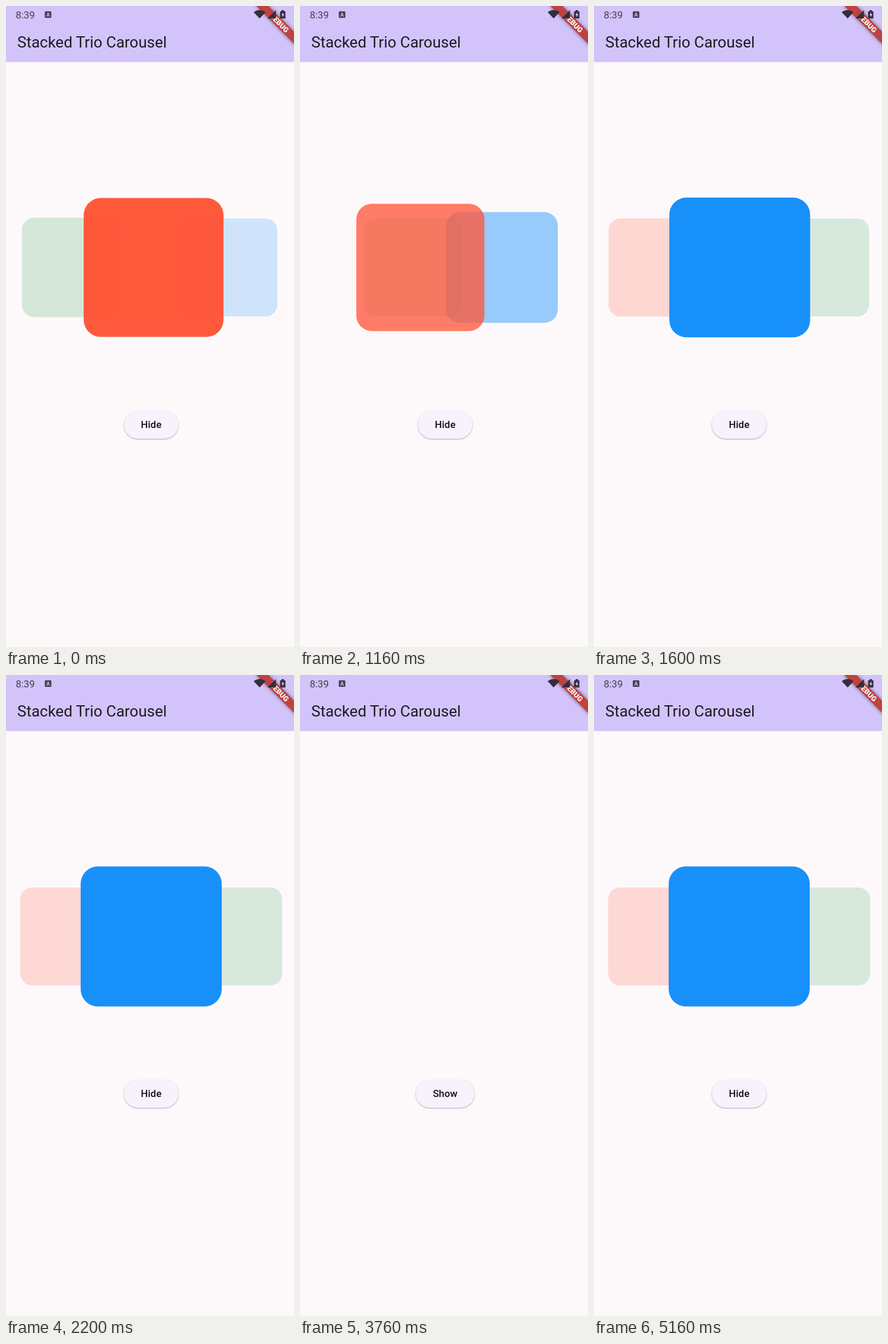
An HTML page that plays this animation: 486x1080 px, repeating every 5.2 s.

```html
<!DOCTYPE html>
<html lang="en">
<head>
<meta charset="utf-8">
<title>Stacked Trio Carousel</title>
<style>
  html, body { margin: 0; width: 100%; height: 100%; overflow: hidden; background: #fdf9fb; }
  svg { display: block; width: 100vw; height: 100vh; }
  text { font-family: Roboto, "Open Sans", sans-serif; }
  .shadow { filter: drop-shadow(0 1px 1px rgba(40, 20, 60, .38)); }
</style>
</head>
<body>
<svg viewBox="0 0 486 1080" xmlns="http://www.w3.org/2000/svg">
  <defs>
    <radialGradient id="ink">
      <stop offset="0" stop-color="#4d2a6e" stop-opacity=".11"/>
      <stop offset=".5" stop-color="#4d2a6e" stop-opacity=".1"/>
      <stop offset="1" stop-color="#4d2a6e" stop-opacity=".035"/>
    </radialGradient>
    <clipPath id="pill"><rect class="pill" y="682" height="47" rx="23.5"/></clipPath>
    <filter id="blur" x="-20%" y="-100%" width="140%" height="300%"><feGaussianBlur stdDeviation="3"/></filter>
  </defs>

  <rect width="486" height="1080" fill="#fdf9fb"/>
  <rect width="486" height="94.5" fill="#d3c3fb"/>
  <text x="19" y="70" font-size="26" fill="#1d1b20">Stacked Trio Carousel</text>

  <g id="cards"></g>

  <rect class="pill shadow" y="682" height="47" rx="23.5" fill="#f7f2fb"/>
  <g clip-path="url(#pill)"><circle id="ripple" cy="706" fill="url(#ink)"/></g>
  <text id="label" x="245" y="711.3" font-size="16.7" font-weight="500" letter-spacing=".1"
        text-anchor="middle" fill="#120f18">Hide</text>

  <g transform="translate(490 0) rotate(45)">
    <rect x="-48" y="33.4" width="96" height="14.3" fill="#000" opacity=".5" filter="url(#blur)"/>
    <rect x="-48" y="33.4" width="96" height="14.3" fill="#c0413f"/>
    <text y="44.9" font-size="12.2" font-weight="900" text-anchor="middle" fill="#fff">DEBUG</text>
  </g>

  <g fill="#453e50">
    <text x="16.5" y="20.5" font-size="16.6">8:39</text>
    <rect x="65.5" y="9" width="11" height="11" rx="1.5"/>
    <text x="71" y="18" font-size="9" font-weight="700" text-anchor="middle" fill="#d3c3fb">A</text>
    <path fill="#342e3c" d="M418 10.5Q428 3 438 10.5L428 21Z"/>
    <path fill="#342e3c" d="M441 21L455.500 7V21Z"/>
    <path fill="#342e3c" d="M462.500 9h2.500v-2h4v2h2.500v12h-9z"/>
    <path fill="#d3c3fb" d="M467.700 10.500l-3 5h2v3.500l3-5h-2z"/>
  </g>
</svg>
<script>
const LOOP = 5200;
const HIDE_AT = 2320, SHOW_AT = 4100;
const TAPS = [2220, 4000], INK_MS = 617;
const COLORS = ['#ff5538', '#1890fa', '#43a564'];
const CENTER = { x: 245, y: 440.5 }, SIZE = { w: 238, h: 236 }, SHIFT = 137.8;

// [time, carousel position]: 0 red in front, 1 blue, -1 green
const DRAG = [
  [0, -.028], [220, -.5], [440, -1], [520, -1], [760, -.5], [1000, -.01],
  [1160, .302], [1400, .768], [1540, .965], [1640, 1], [LOOP, 1]
];

const $ = id => document.getElementById(id);
const set = (el, attrs) => { for (const k in attrs) el.setAttribute(k, attrs[k]); };
const clamp = v => Math.min(1, Math.max(0, v));
const pills = document.querySelectorAll('.pill');

const cards = COLORS.map((fill, i) => {
  const el = document.createElementNS('http://www.w3.org/2000/svg', 'rect');
  set(el, { fill });
  return { el, i };
});

function slope(i) {
  if (i === 0 || i === DRAG.length - 1) return i ? 0 : -.0015;
  const [a, b, c] = [DRAG[i - 1], DRAG[i], DRAG[i + 1]];
  const l = (b[1] - a[1]) / (b[0] - a[0]), r = (c[1] - b[1]) / (c[0] - b[0]);
  return l * r > 0 ? 2 * l * r / (l + r) : 0;
}

function position(t) {
  let i = 0;
  while (i < DRAG.length - 2 && t >= DRAG[i + 1][0]) i++;
  const [t0, p0] = DRAG[i], [t1, p1] = DRAG[i + 1];
  const d = t1 - t0, u = (t - t0) / d, v = 1 - u;
  return p0 * (1 + 2 * u) * v * v + p1 * u * u * (3 - 2 * u)
    + d * u * v * (slope(i) * v - slope(i + 1) * u);
}

function drawCards(p) {
  for (const c of cards) {
    c.slot = ((c.i - p + 1.5) % 3 + 3) % 3 - 1.5;
    const far = Math.abs(c.slot), side = Math.min(far, 1);
    // past the side places a card slides back behind the others
    const dx = far > 1 ? Math.sign(c.slot) * (3 - 2 * far) : c.slot;
    const k = 1 - .3 * side, w = SIZE.w * k, h = SIZE.h * k;
    set(c.el, {
      x: CENTER.x + dx * SHIFT - w / 2, y: CENTER.y - h / 2,
      width: w, height: h, rx: 29 * k, opacity: 1 - .8 * side
    });
  }
  const order = [...cards].sort((a, b) => Math.abs(b.slot) - Math.abs(a.slot));
  $('cards').replaceChildren(...order.map(c => c.el));
}

function drawButton(t, hidden) {
  const w = hidden ? 99 : 92;
  pills.forEach(el => set(el, { x: 245 - w / 2, width: w }));
  $('label').textContent = hidden ? 'Show' : 'Hide';

  const start = TAPS.find(s => t >= s && t < s + INK_MS);
  const u = start === undefined ? 1 : (t - start) / INK_MS;
  const grow = 1 - (1 - clamp(u / .75)) ** 2.2;
  set($('ripple'), {
    cx: 234 + 8 * grow, r: 62 * grow,
    opacity: Math.min(clamp(u / .13), clamp((1 - u) / .6))
  });
}

function draw(t) {
  const hidden = t >= HIDE_AT && t < SHOW_AT;
  $('cards').style.display = hidden ? 'none' : '';
  drawCards(position(t));
  drawButton(t, hidden);
}

const began = performance.now();
function tick() {
  draw((performance.now() - began) % LOOP);
  requestAnimationFrame(tick);
}
tick();
</script>
</body>
</html>
```
